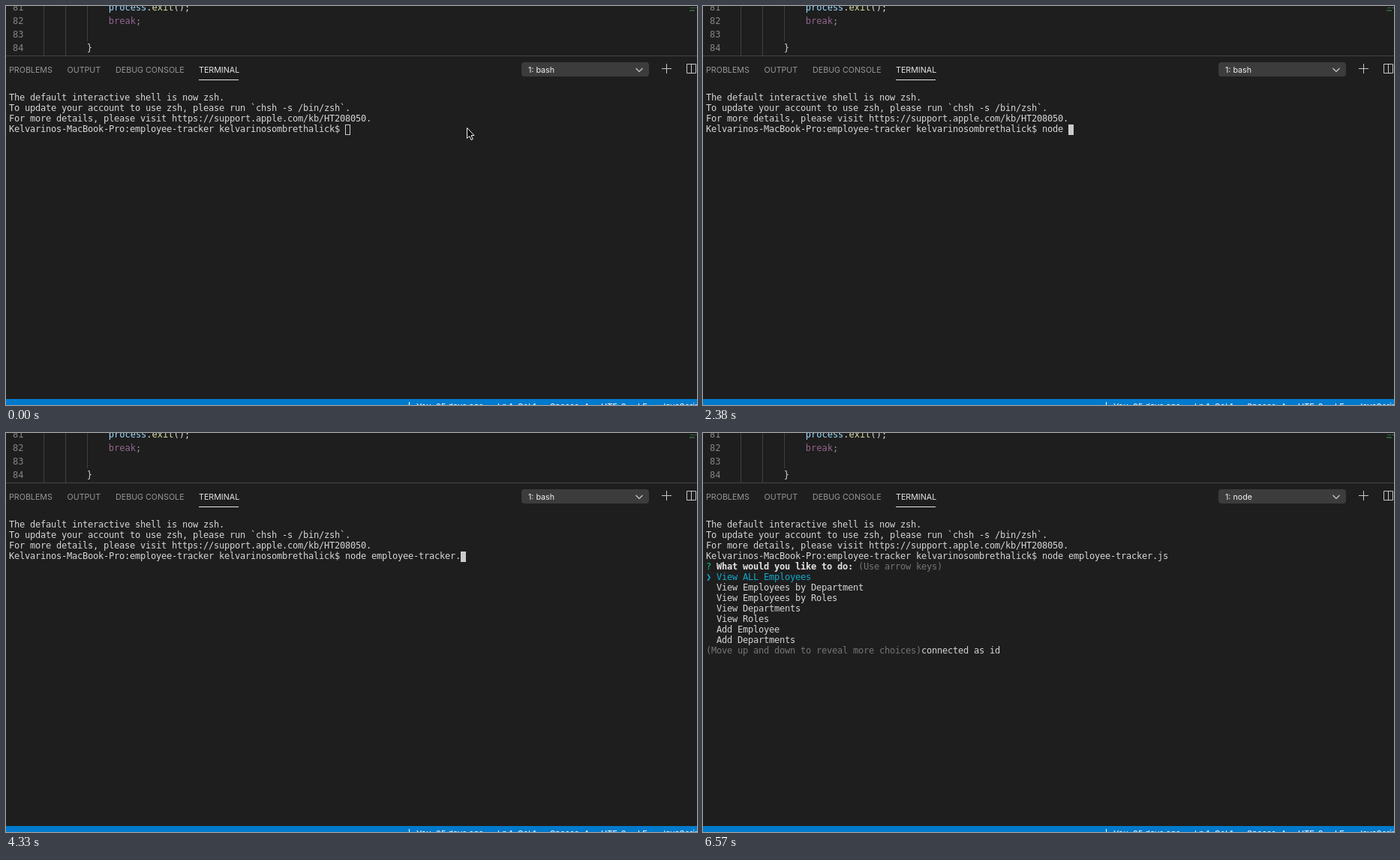
Animation, 921 px wide and 532 px high, one loop 8 s. Source, as an HTML page with a canvas:

```html
<!DOCTYPE html>
<html lang="en">
<head>
<meta charset="utf-8">
<title>Terminal session</title>
<style>
  html, body { margin: 0; width: 100%; height: 100%; overflow: hidden; background: #1e1e1e; }
  canvas { display: block; }
</style>
</head>
<body>
<canvas id="stage" width="921" height="532"></canvas>
<script>
const ctx = document.getElementById('stage').getContext('2d');
const LOOP = 8000;
const MONO = '12px "DejaVu Sans Mono", monospace';
const SANS = '10.7px Inter, sans-serif';
const FG = '#d6d6d6', DIM = '#757575', GREEN = '#0dbc79', CYAN = '#11a8cd', ICON = '#c8c8c8';
const CELL = 7, ROW = 14, LEFT = 4, TOP = 116;

const PROMPT = 'Kelvarinos-MacBook-Pro:employee-tracker kelvarinosombrethalick$ ';
const COMMAND = 'node employee-tracker.js';
// [time, number of command characters on screen]
const KEYS = [[1200, 1], [1340, 2], [1490, 3], [1790, 4], [1940, 5], [3730, 6], [3880, 7],
  [4030, 8], [4180, 9], [4330, 22], [5380, 23], [5530, 24]];
const FOCUS = 150, MOUSE_HIDDEN = 2380, ENTER = 5970, RELABEL = 6120, MENU = 6570;

const GREETING = [
  'The default interactive shell is now zsh.',
  'To update your account to use zsh, please run `chsh -s /bin/zsh`.',
  'For more details, please visit https://support.apple.com/kb/HT208050.'
];
const CHOICES = ['View Employees by Department', 'View Employees by Roles', 'View Departments',
  'View Roles', 'Add Employee', 'Add Departments'];

function rect(x, y, w, h, color) {
  ctx.fillStyle = color;
  ctx.fillRect(x, y, w, h);
}

function label(text, x, y, color, font = SANS) {
  ctx.font = font;
  ctx.fillStyle = color;
  ctx.fillText(text, x, y);
}

// Draws text on a fixed character grid and returns the x after it.
function grid(text, x, y, color, advance, font = MONO) {
  for (const ch of text) {
    label(ch, x, y, color, font);
    x += advance;
  }
  return x;
}

// Writes coloured runs [text, color, font] on one terminal row.
function line(row, ...runs) {
  let x = LEFT;
  for (const [text, color = FG, font = MONO] of runs) {
    x = grid(text, x, TOP + row * ROW + 10, color, CELL, font);
  }
}

function stroke(path, color, width = 1) {
  ctx.strokeStyle = color;
  ctx.lineWidth = width;
  ctx.stroke(new Path2D(path));
}

function drawEditor() {
  const code = (text, x, y, color) => grid(text, x, y, color, 7.22);
  ['81', '82', '83', '84'].forEach((n, i) => code(n, 9, 6 + i * 18, '#858585'));
  rect(50, 0, 1, 66, '#404040');
  rect(79, 0, 1, 66, '#404040');
  rect(108, 0, 1, 47, '#404040');
  let x = code('process', 136.8, 6, '#9cdcfe');
  x = code('.', x, 6, '#d4d4d4');
  x = code('exit', x, 6, '#dcdcaa');
  code('();', x, 6, '#d4d4d4');
  x = code('break', 136.8, 24, '#93658f');
  code(';', x, 24, '#979797');
  code('}', 107.8, 60, '#d4d4d4');
  rect(912, 2, 5, 1, '#2f6b43');
  rect(918, 2, 3, 1, '#2f6b43');
  rect(911, 5, 7, 2, '#2b5a3a');
}

function drawPanelHeader(shell) {
  rect(0, 66, 921, 1, '#444');
  label('PROBLEMS', 4, 89, '#979797');
  label('OUTPUT', 81.5, 89, '#979797');
  label('DEBUG CONSOLE', 146, 89, '#979797');
  label('TERMINAL', 257, 89, '#e7e7e7');
  rect(257, 98, 53, 1, '#e7e7e7');

  ctx.fillStyle = '#3c3c3c';
  ctx.beginPath();
  ctx.roundRect(687, 75, 170, 19, 4);
  ctx.fill();
  label('1: ' + shell, 696, 89, '#f0f0f0');
  stroke('M839.5 83 L844 87.5 L848.5 83', '#d0d0d0', 1.1);
  stroke('M874 83.5 H887 M880.5 77 V90', ICON);
  stroke('M907.5 77.5 H919.5 V89.5 H907.5 Z M913.5 77.5 V89.5', ICON);
}

function drawStatusBar() {
  rect(0, 524, 921, 8, '#007acc');
  rect(537, 528, 1, 4, '#fff');
  const items = [['You, 25 days ago', 547], ['Ln 1, Col 1', 655], ['Spaces: 4', 725],
    ['UTF-8', 793], ['LF', 842], ['JavaScript', 873]];
  for (const [text, x] of items) label(text, x, 538, '#fff', '11px Inter, sans-serif');
}

function drawTerminal(t) {
  const typed = KEYS.reduce((n, [at, count]) => t >= at ? count : n, 0);
  GREETING.forEach((text, i) => line(i, [text]));
  line(3, [PROMPT + COMMAND.slice(0, typed)]);

  if (t >= MENU) {
    line(4, ['? ', GREEN], ['What would you like to do:', '#e2e2e2', 'bold ' + MONO],
      [' (Use arrow keys)', DIM]);
    line(5, ['❯ View ALL Employees', CYAN]);
    CHOICES.forEach((text, i) => line(6 + i, ['  ' + text]));
    line(12, ['(Move up and down to reveal more choices)', DIM], ['connected as id']);
  } else if (t >= ENTER) {
    rect(LEFT, TOP + 4 * ROW, CELL, ROW, '#ccc');
  } else {
    const x = LEFT + (PROMPT.length + typed) * CELL, y = TOP + 3 * ROW;
    if (t >= FOCUS) {
      rect(x, y, CELL, ROW, '#ccc');
    } else {
      ctx.strokeStyle = '#ccc';
      ctx.lineWidth = 1;
      ctx.strokeRect(x + 0.5, y + 0.5, CELL - 1, ROW - 1);
    }
  }
}

function drawMouse(t) {
  if (t < FOCUS) {
    const arrow = 'M614.5 162.5 V176.5 L617.7 173.4 L620 178.5 L622.2 177.5 L620 172.6 H624 Z';
    ctx.fillStyle = '#000';
    ctx.fill(new Path2D(arrow));
    stroke(arrow, '#fff');
  } else if (t < MOUSE_HIDDEN) {
    stroke('M611.5 156.7 Q614.5 156.7 614.5 159 V169 Q614.5 171.3 611.5 171.3 ' +
      'M617.5 156.7 Q614.5 156.7 614.5 159 M614.5 169 Q614.5 171.3 617.5 171.3 M613 164.5 H616', '#f0f0f0', 1.2);
  }
}

function draw(now) {
  const t = now % LOOP;
  rect(0, 0, 921, 532, '#1e1e1e');
  drawEditor();
  drawPanelHeader(t < RELABEL ? 'bash' : 'node');
  drawTerminal(t);
  drawStatusBar();
  drawMouse(t);
}

const start = performance.now();
function tick() {
  draw(performance.now() - start);
  requestAnimationFrame(tick);
}
tick();
</script>
</body>
</html>
```
